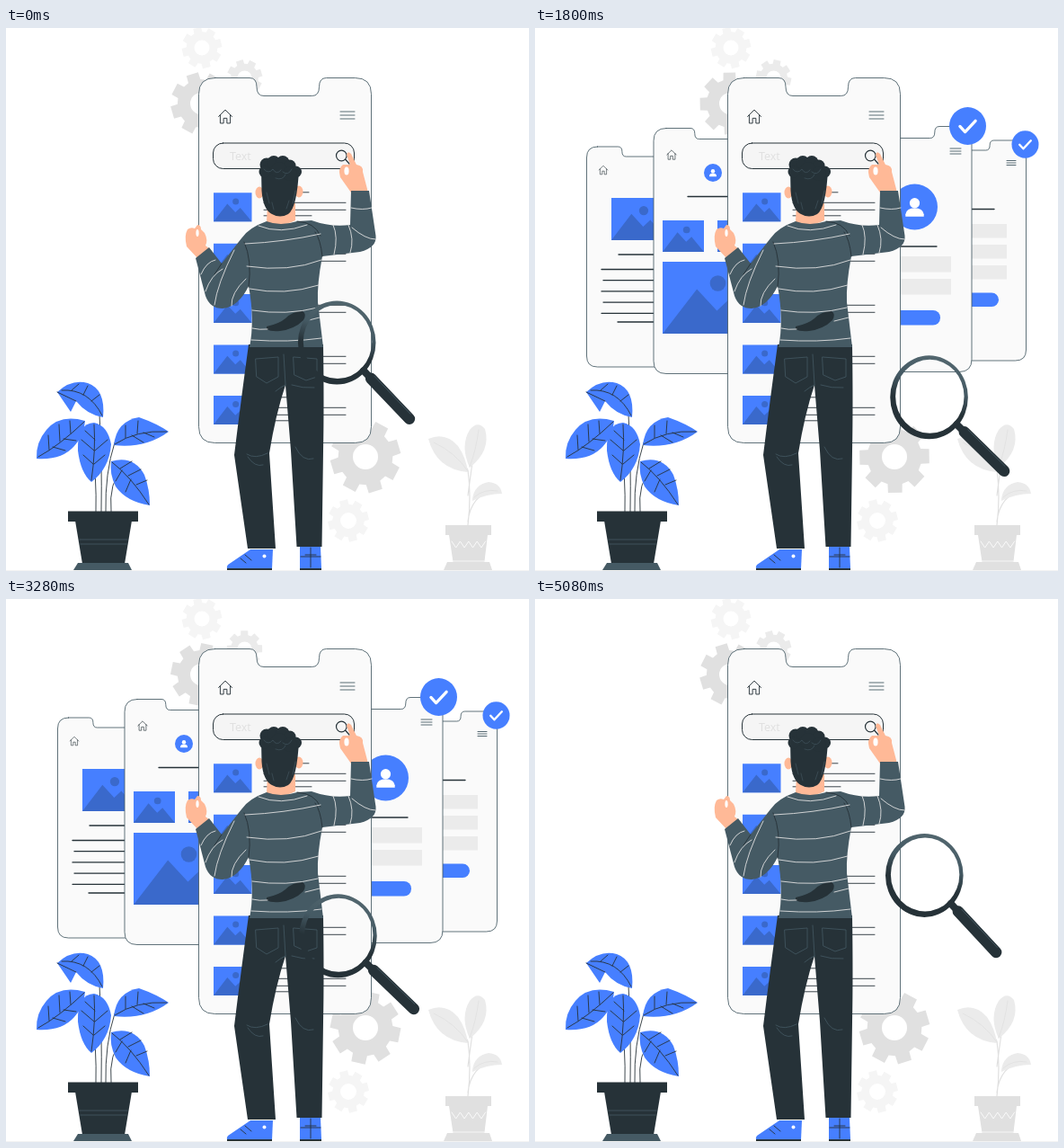
Animation of 582x604 px, one loop 5.12 s. Source, as an HTML page with a canvas:

```html
<!DOCTYPE html>
<html lang="en">
<head>
<meta charset="utf-8">
<title>Search illustration</title>
<style>
html, body { margin: 0; width: 100%; height: 100%; overflow: hidden; background: #fff; }
canvas { display: block; width: 582px; height: 604px; }
</style>
</head>
<body>
<canvas id="stage"></canvas>
<script>
const W = 582, H = 604, LOOP = 5120, STEP = 40;
const BLUE = '#467fff', DEEP = '#3a69cb', DARK = '#263238', SLATE = '#455a64', SKIN = '#ffb997',
      PAPER = '#fafafa', G1 = '#ebebeb', G2 = '#e0e0e0', G3 = '#f5f5f5';
const canvas = document.getElementById('stage');
const dpr = window.devicePixelRatio || 1;
canvas.width = W * dpr;
canvas.height = H * dpr;
const c = canvas.getContext('2d');
c.lineCap = c.lineJoin = 'round';

function path(d, fill, stroke, width = 1) {
  const p = new Path2D(d);
  if (fill) { c.fillStyle = fill; c.fill(p); }
  if (stroke) { c.strokeStyle = stroke; c.lineWidth = width; c.stroke(p); }
}

function rect(x, y, w, h, fill, r = 0) {
  c.fillStyle = fill;
  c.beginPath();
  c.roundRect(x, y, w, h, r);
  c.fill();
}

function dot(x, y, r, fill, ry = r) {
  c.fillStyle = fill;
  c.beginPath();
  c.ellipse(x, y, r, ry, 0, 0, 7);
  c.fill();
}

const line = (x1, x2, y, w = 1.1, col = DARK) => path(`M${x1} ${y}H${x2}`, null, col, w);

function shifted(dx, draw) {
  c.save();
  c.translate(dx, 0);
  draw();
  c.restore();
}

function gear(x, y, r, hole, col, turn = 0) {
  c.beginPath();
  for (let i = 0; i < 8; i++) {
    const mid = turn + i * Math.PI / 4;
    for (const [off, k] of [[-.27, .77], [-.2, 1], [.2, 1], [.27, .77]]) {
      c.lineTo(x + r * k * Math.cos(mid + off), y + r * k * Math.sin(mid + off) * 1.03);
    }
  }
  c.closePath();
  c.moveTo(x + hole, y);
  c.arc(x, y, hole, 0, 7);
  c.fillStyle = col;
  c.fill('evenodd');
}

function phone(x, y, w, h, r, left, right, depth) {
  const a = depth * .4, b = depth / 2;
  path(`M${x + r} ${y}H${x + left}q${a} 0 ${a} ${b}q0 ${b} ${a} ${b}` +
    `H${x + w - right - 2 * a}q${a} 0 ${a} ${-b}q0 ${-b} ${a} ${-b}H${x + w - r}` +
    `q${r} 0 ${r} ${r}V${y + h - r}q0 ${r} ${-r} ${r}H${x + r}q${-r} 0 ${-r} ${-r}V${y + r}q0 ${-r} ${r} ${-r}z`,
    PAPER, SLATE, .85);
}

function picture(x, y, w, h) {
  rect(x, y, w, h, BLUE);
  const b = y + h;
  path(`M${x} ${b}L${x + w * .36} ${y + h * .38}L${x + w * .57} ${y + h * .68}L${x + w * .7} ${y + h * .52}L${x + w} ${b}z`, DEEP);
  dot(x + w * .58, y + h * .3, Math.min(w, h) * .11, DEEP);
}

function home(x, y, s) {
  c.save();
  c.translate(x, y);
  c.scale(s, s);
  path('M-8 0L0 -8L8 0M-6 -2V8H-2V2H2V8H6V-2', null, DARK, 1);
  c.restore();
}

function menu(x, y, w, gap) {
  for (let i = 0; i < 3; i++) line(x, x + w, y + i * gap, .9, SLATE);
}

function avatar(x, y, r) {
  dot(x, y, r, BLUE);
  dot(x, y - r * .17, r * .22, '#fff');
  path(`M${x - r * .4} ${y + r * .42}v${-r * .1}q${r * .05} ${-r * .27} ${r * .4} ${-r * .27}q${r * .35} 0 ${r * .4} ${r * .27}v${r * .1}z`, '#fff');
}

function check(x, y, r) {
  dot(x, y, r, BLUE, r * 1.02);
  path(`M${x - r * .42} ${y + r * .02}l${r * .28} ${r * .3}l${r * .56} ${-r * .6}`, null, '#fff', r * .16);
}

function sidePhones(k) {
  shifted(165 * k, () => {
    phone(57.5, 132, 134, 245, 12, 35, 35, 11);
    home(76, 158, .6);
    picture(85, 189, 62, 47);
    line(93, 150, 252, 1.3);
    for (let i = 0; i < 5; i++) line(74 + (i % 2) * 2, 165, 268.5 + i * 12.2, 1.3);
    line(92, 150, 327, 1.3);
  });
  shifted(86 * k, () => {
    phone(132, 111.5, 138, 273, 14, 41, 41, 12);
    home(152, 141, .65);
    avatar(198, 161, 10);
    line(170, 228, 187.5, 1.3);
    picture(142, 214, 46, 35);
    picture(203, 214, 46, 35);
    picture(142, 260, 106, 80);
  });
  shifted(-190 * k, () => {
    phone(412.5, 125, 134, 245, 12, 36, 36, 11);
    menu(525, 147.5, 10, 2.5);
    line(460, 511, 201.5, 1.3);
    for (const y of [218, 241, 264]) rect(455, y, 70, 15.5, G1);
    rect(455, 294.5, 61, 15.5, BLUE, 8);
  });
  shifted(-97 * k, () => {
    phone(348, 109.5, 138, 273, 14, 36, 36, 13);
    menu(462, 134, 12, 3);
    avatar(422.5, 199, 25.5);
    line(395, 447, 243, 1.3);
    rect(385, 254, 78, 17.5, G1);
    rect(385, 279, 78, 17.5, G1);
    rect(390, 314, 61, 16.5, BLUE, 8);
    check(481.5, 109, 20.5);
  });
  shifted(-190 * k, () => check(545.5, 129.5, 15));
}

function mainPhone() {
  phone(214.5, 55.5, 192, 406, 18, 56.5, 50, 20);
  home(244, 98.5, .93);
  menu(372, 93, 16, 4);
  c.beginPath();
  c.roundRect(230.5, 128, 157, 28.5, 11);
  c.fillStyle = G3;
  c.fill();
  c.strokeStyle = DARK;
  c.lineWidth = 1;
  c.stroke();
  c.fillStyle = G2;
  c.font = '12.5px "Open Sans", "Noto Sans", sans-serif';
  c.fillText('Text', 249, 147);
  path('M367.5 142a5.8 5.8 0 1 0 11.6 0a5.8 5.8 0 1 0 -11.6 0M377.5 146L382 151', null, DARK, 1.2);
  for (let i = 0; i < 5; i++) {
    picture(231, 183.3 + i * 56.4, 42.5, 32);
    const y = 194.3 + i * 57;
    line(287, 337, y - 11.5, .9);
    line(287, 378, y, .9);
    line(287, 378, y + 8, .9);
    line(287, 340, y + 14.5, .9);
  }
}

function potted() {
  path('M100 538Q101 500 96 470M106 538Q107 480 104 430M111 538Q110 495 121 461M117 538Q114 505 130 490', null, DARK, .9);
  const leaves = [
    'M57 405Q73 390 91 395Q111 402 108 433Q90 430 78 415L72 427z',
    'M88 437Q60 429 45 447Q33 461 34 479Q62 481 76 465Q87 453 88 437z',
    'M98 439Q79 440 80 470Q83 495 95 505Q115 490 117 463Q113 442 98 439z',
    'M120 464Q123 437 148 433Q168 440 181 449Q155 468 120 464z',
    'M117 482Q142 475 154 497Q160 513 160 531Q134 527 122 510Q115 496 117 482z'
  ];
  for (const d of leaves) path(d, BLUE);
  path('M62 403Q92 401 107 431M73 403l8 -7M86 408l5 -10M95 415l9 -7M57 405L78 415' +
    'M36 477Q60 464 87 438M48 469l-1 -16M60 460l-1 -19M72 451l-1 -14M52 466l14 4M64 457l14 2' +
    'M95 503Q100 470 98 441M97 485l-11 -10M98 470l-14 -12M99 458l-11 -10M98 485l12 -10M99 470l14 -12' +
    'M121 463Q145 447 179 449M133 456l0 -14M146 451l1 -14M140 453l13 8M153 450l12 5' +
    'M118 483Q139 499 159 530M127 490l13 -8M136 498l14 -7M145 508l12 -5M129 492l-7 12M139 502l-6 14', null, DARK, .9);
  path('M77 548H140L132 596H85z', DARK);
  rect(69, 537.5, 78, 11.5, DARK);
  path('M82 569H135M83 574H134', null, SLATE, .8);
  path('M80 595H136L140 603H75z', SLATE);
}

function palePlant() {
  path('M514 553Q518 520 514 492Q506 475 478 460M514 520Q518 490 523 455M514 549Q517 520 545 512', null, G2, 1.2);
  path('M514 494Q479 491 470 457Q489 449 503 465Q512 478 514 494zM516 489Q505 465 516 447Q525 436 533 446Q540 470 516 489zM519 524Q521 508 537 505Q550 506 552 518Q535 518 519 526z', G1);
  path('M476 461Q500 472 514 493M526 447Q523 470 516 488M521 522Q532 512 547 515', null, G2, .8);
  path('M493 564H536L532 597H498z', G2);
  rect(489, 553, 51, 11, G2);
  path('M496 571l4.7 7l4.7 -7l4.7 7l4.7 -7l4.7 7l4.7 -7l4.7 7l4.7 -7', null, PAPER, 1);
  path('M491 594H538L541 603H487z', G2);
  path('M495 593H535', null, PAPER, .8);
}

function man() {
  // shoes
  path('M272 580L247 597Q245 599 246 602H296L297 580z', BLUE);
  path('M246 601H296V603H246zM327 601H351V603H327z', DARK);
  path('M327 577H350L351 601H327z', BLUE);
  path('M266 586l7 6M261 590l6 5M328 588H350M339 578V600M333 586l12 0', null, DARK, .9);
  dot(287.5, 587.5, 2, '#fff');
  // trousers
  path('M270 352H353Q354 420 353 470L351.5 577H323.5L317 470L311 397Q300 430 293 473L300 579H269L254 475Q262 410 270 352z', DARK);
  path('M278 368L303 366V388L290 395L279 388zM320 366L346 368V388L334 392L321 386zM311 397L309 363M311 397q-5 2 -11 7M318 397q12 4 25 3M268 474q9 6 23 -1M269 477q8 12 17 9M322 466q8 17 20 13', null, SLATE, .8);
  // neck and ears
  path('M291 195H322V214Q307 222 290 216z', SKIN);
  dot(282, 183, 4.5, SKIN, 6.5);
  dot(326, 182, 4.5, SKIN, 6.5);
  // hands
  path('M214 257L201 243Q198 231 202 224Q206 221 210 223L213 219Q217 219 217 224L221 228Q225 236 222 242L227 246z', SKIN);
  dot(213, 228, 1.6, '#fff', 4);
  path('M384 183L372 166Q369 156 375 152L383 152L379 141Q380 136 384 140L390 152Q398 153 397 160L403 183z', SKIN);
  dot(379, 159, 2.6, '#fff', 4.5);
  // jumper
  path('M290 215Q305 221 324 215L340 214Q362 222 383 219L384 181H404L411.5 231Q413 244 394 249L352 254Q346 285 347 305L353 355H271Q277 325 270 287Q259 310 241 312Q227 312 222 298L211 256L226 244L240 262L262 234Q270 222 290 215z', SLATE);
  path('M265 238Q274 258 270 288M352 254Q350 235 344 227M324 215Q343 216 350 231M240 262L232 274', null, DARK, .9);
  path('M290 332Q304 329 311 323Q319 315 330 315Q335 318 331 325Q321 335 305 337Q295 338 290 335z', DARK);
  path('M266 240Q310 238 350 229M268 265Q315 272 351 258M271 290Q310 298 348 286M274 314Q312 320 347 311M274 334Q282 336 291 335M333 326L349 322M273 347Q315 350 351 345M281 220Q305 230 335 219' +
    'M364 219Q370 232 365 252M381 219Q388 235 383 250M384 200Q397 203 407 200M385 222Q400 235 411 235' +
    'M217 274Q223 260 233 258M222 293Q228 275 241 268M232 308Q235 285 254 247M251 309Q250 295 267 279', null, G2, .9);
  // hair
  path('M284 157L284.5 181Q286 202 296 207Q305 212 314 207Q324 200 326 157z', DARK);
  const curls = [[290, 152, 7.5], [298, 149.5, 7.5], [308, 149.5, 7.5], [316, 153, 6.5], [322.5, 160, 6.5], [288, 160, 6.5], [304, 158, 9], [316, 162, 8]];
  for (const [x, y, r] of curls) dot(x, y, r, DARK);
  path('M287 157q5 6 10 0q4 7 9 1M308 160q6 5 10 -3M300 167q8 3 11 -4M290 183l3 12M322 181l-3 14M296 194l2 8M315 192l-3 9', null, SLATE, .6);
}

// Lens drifts with separate sideways, vertical and tilt cycles.
function magnifier(t) {
  const turn = (ms, period) => 2 * Math.PI * ms / period;
  const x = 405.2 - 37 * Math.cos(turn(t, 3150));
  const y = 350 - 76 * Math.sin(turn(t, 2112));
  const tilt = (43.2 - 10 * Math.cos(turn(t - 950, 3150))) * Math.PI / 180;
  c.save();
  c.translate(x, y);
  c.save();
  c.rotate(tilt);
  path('M43 0H54', null, DARK, 8);
  path('M55 0H117', null, DARK, 12.5);
  path('M56 -4.5H114', null, SLATE, .8);
  c.restore();
  const shade = c.createLinearGradient(15, -46, -12, 46);
  shade.addColorStop(0, '#53676f');
  shade.addColorStop(.35, SLATE);
  shade.addColorStop(.6, DARK);
  c.fillStyle = shade;
  c.beginPath();
  c.ellipse(0, 0, 43.3, 46.5, 0, 0, 7);
  c.closePath();
  c.moveTo(39, -1);
  c.ellipse(.8, -1, 38.2, 41, 0, 0, 7);
  c.fill('evenodd');
  c.restore();
}

// 1 = tucked behind the main phone, 0 = fully spread.
function tuck(t) {
  if (t < 980) return (1 - t / 980) ** 2;
  const p = Math.min(1, Math.max(0, (t - 4000) / 680));
  return p < .5 ? 2 * p * p : 1 - 2 * (1 - p) ** 2;
}

function draw(t) {
  c.setTransform(dpr, 0, 0, dpr, 0, 0);
  c.fillStyle = '#fff';
  c.fillRect(0, 0, W, H);
  const spin = t / LOOP * Math.PI / 4;
  gear(218, 22, 22.5, 8.5, G3, .54);
  gear(381, 548, 23, 9, G3, .54);
  gear(217, 84, 34, 12, G2, spin + .49);
  gear(265.5, 55.5, 20, 8, G1, .49 - spin);
  gear(400, 477, 39.5, 14, G2, spin + .49);
  line(0, W, 603.5, .6, G1);
  palePlant();
  const k = tuck(t);
  if (k < 1) sidePhones(k);
  mainPhone();
  potted();
  man();
  magnifier(t);
}

const start = performance.now();
function tick() {
  const t = (performance.now() - start) % LOOP;
  draw(Math.floor(t / STEP) * STEP);
  requestAnimationFrame(tick);
}
tick();
</script>
</body>
</html>
```
